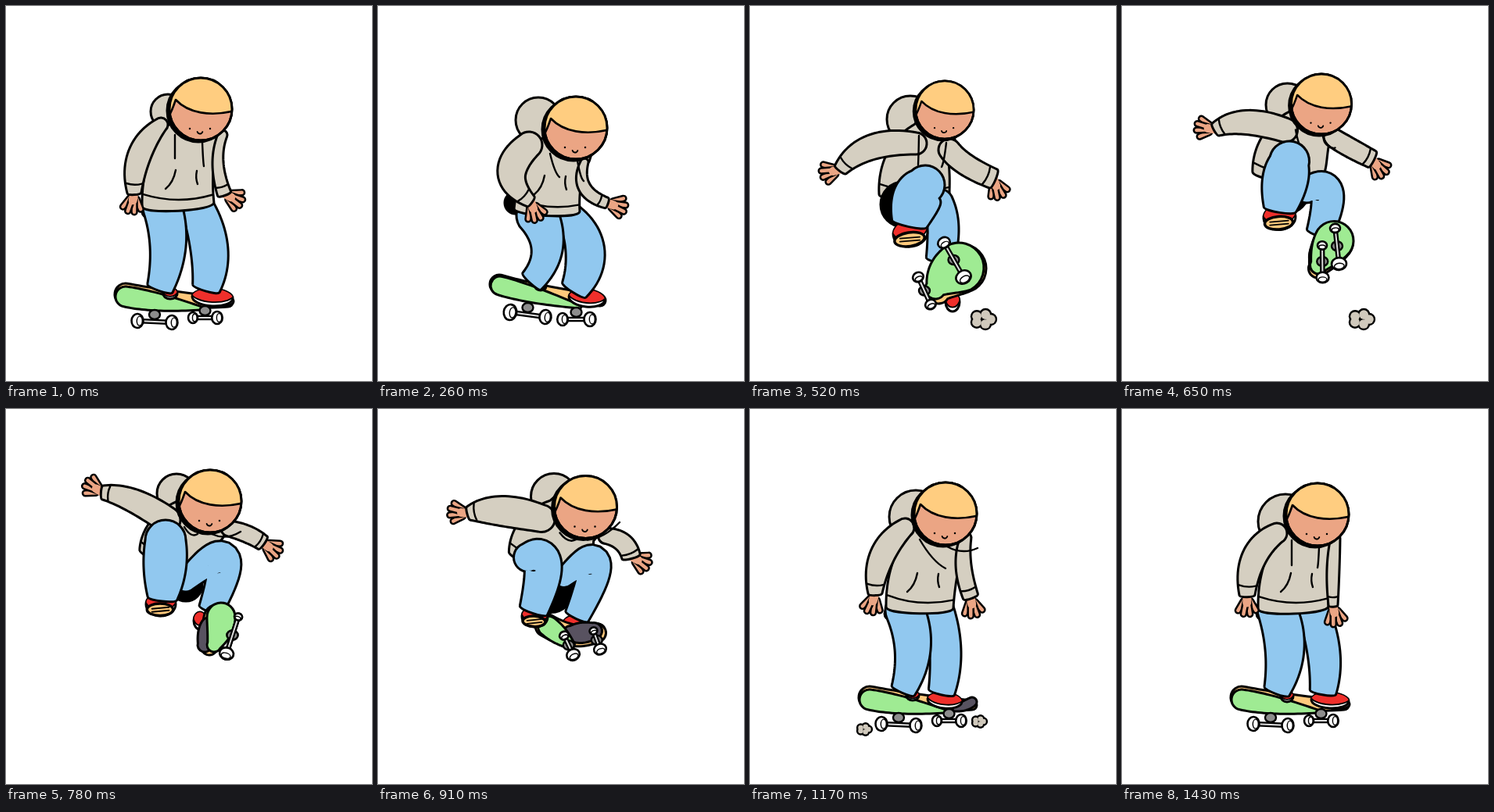
Write an HTML page with a canvas that moves like this. It is 468 px wide and 480 px high and loops after 1560 ms.

```html
<!DOCTYPE html>
<html lang="en">
<head>
<meta charset="utf-8">
<title>Skater</title>
<style>
html, body { margin: 0; width: 100%; height: 100%; overflow: hidden; background: #fff; }
canvas { display: block; }
</style>
</head>
<body>
<canvas id="stage" width="468" height="480"></canvas>
<script>
const ctx = document.getElementById('stage').getContext('2d');
const STEP = 130, COUNT = 12, LINE = 3;
const INK = '#000', CLOTH = '#d5cfc1', SKIN = '#eba584', HAIR = '#ffcd80', DENIM = '#91c8ef';
const RED = '#ef2f2b', GREEN = '#9feb93', WOOD = '#ffc97c', GRIP = '#585260';

// Limbs, torso and deck are three joints [x, y, half width]; hands are the way they point.
const rolling = {
  air: 0, flip: 0,
  rim: [[153, 369, 14], [215, 376, 11], [284, 379, 6]],
  face: [[153, 372, 13], [195, 379, 11], [250, 387, 2]],
  grip: [[270, 382, 2], [280, 381, 3], [287, 378, 4]],
  trucks: [[168, 403, 10, 212, 405, 10], [239, 399, 8, 270, 399, 9]]
};

const stand = {
  ...rolling,
  head: [249, 132, 41], hood: [207, 135, 22], shade: [182, 263, 8],
  body: [[242, 165, 34], [224, 205, 42], [220, 254, 46]],
  armL: [[198, 152, 9], [171, 190, 15], [164, 239, 9]], handL: 1.75,
  armR: [[277, 165, 6], [271, 200, 7], [279, 240, 9]], handR: .5,
  legL: [[200, 258, 25], [207, 308, 23], [197, 361, 17]],
  legR: [[245, 258, 21], [260, 312, 24], [256, 361, 18]],
  shoeL: [210, 368, 9, 7, 0, 0], shoeR: [264, 373, 26, 11, .05, 0],
  tips: [216, 195, 253, 205]
};

const crouch = {
  air: 0, flip: 0,
  rim: [[155, 356, 12], [214, 367, 9], [284, 377, 7]],
  face: [[156, 358, 12], [200, 370, 10], [258, 385, 2]],
  grip: [[275, 381, 2], [281, 380, 3], [286, 378, 4]],
  trucks: [[169, 392, 11, 214, 398, 10], [236, 401, 9, 271, 401, 10]],
  head: [253, 156, 41], hood: [205, 146, 29], shade: [176, 252, 14],
  body: [[240, 185, 33], [223, 220, 38], [216, 261, 42]],
  armL: [[193, 178, 17], [171, 215, 18], [195, 250, 8]], handL: 1.2,
  armR: [[264, 200, 5], [264, 232, 8], [292, 252, 7]], handR: .3,
  legL: [[204, 268, 27], [216, 312, 20], [197, 352, 16]],
  legR: [[245, 268, 17], [265, 315, 25], [251, 363, 18]],
  shoeL: [208, 359, 7, 5, 0, 0], shoeR: [267, 374, 23, 11, .1, 0],
  tips: [232, 219, 263, 224]
};

const pop = {
  air: 1, flip: 1,
  rim: [[271, 336, 31], [254, 350, 26], [241, 367, 14]],
  face: [[267, 335, 32], [250, 347, 26], [237, 362, 13]],
  grip: [[262, 340, 20], [250, 350, 18], [242, 360, 8]],
  trucks: [[215, 347, 8, 231, 382, 8], [248, 303, 9, 273, 347, 11]],
  head: [249, 133, 38], hood: [205, 145, 30], shade: [196, 254, 29],
  body: [[232, 172, 30], [215, 202, 42], [210, 240, 45]],
  armL: [[212, 176, 14], [155, 181, 16], [116, 209, 9]], handL: 2.9,
  armR: [[255, 184, 14], [276, 203, 14], [311, 221, 13]], handR: 1.2,
  legL: [[224, 229, 25], [213, 247, 31], [204, 278, 23]],
  legR: [[242, 252, 18], [247, 285, 20], [243, 325, 18]],
  shoeL: [205, 291, 22, 17, -.15, 1], shoeR: [259, 379, 9, 12, 0, 0],
  tips: [215, 203, 245, 206]
};

const apex = {
  air: 1, flip: 1,
  rim: [[271, 268, 18], [266, 287, 16], [260, 305, 10]],
  face: [[275, 266, 18], [273, 283, 16], [266, 302, 9]],
  grip: [[262, 280, 14], [258, 290, 13], [254, 302, 9]],
  trucks: [[297, 266, 6, 282, 313, 10], [297, 266, 6, 282, 313, 10]],
  head: [261, 118, 41], hood: [218, 108, 25], shade: [230, 225, 21],
  body: [[245, 145, 38], [225, 170, 48], [212, 195, 44]],
  armL: [[206, 142, 17], [162, 117, 15], [124, 107, 9]], handL: 3.66,
  armR: [[285, 153, 10], [308, 160, 11], [328, 171, 10]], handR: .6,
  legL: [[204, 168, 26], [203, 205, 27], [200, 242, 19]],
  legR: [[230, 220, 14], [277, 192, 22], [262, 257, 16]],
  shoeL: [198, 250, 19, 15, 0, 1], shoeR: [248, 271, 8, 11, 0, 0],
  tips: [245, 160, 300, 157]
};

const land = {
  air: 1, flip: 0,
  rim: [[160, 286, 11], [231, 292, 12], [299, 268, 14]],
  face: [[160, 290, 8], [190, 296, 7], [226, 301, 2]],
  grip: [[230, 294, 5], [262, 283, 13], [298, 266, 12]],
  trucks: [[179, 314, 8, 217, 316, 9], [254, 302, 6, 286, 302, 8]],
  head: [270, 133, 41], hood: [232, 116, 34], shade: [212, 238, 37],
  body: [[250, 142, 38], [229, 170, 57], [216, 200, 54]],
  armL: [[212, 138, 18], [152, 144, 23], [109, 160, 9]], handL: 2.8,
  armR: [[298, 172, 10], [317, 181, 13], [319, 206, 14]], handR: .4,
  legL: [[180, 212, 11], [219, 194, 21], [198, 273, 18]],
  legR: [[246, 212, 11], [276, 202, 20], [247, 273, 16]],
  shoeL: [203, 282, 14, 11, .1, 0], shoeR: [248, 284, 16, 13, .1, 0],
  tips: [262, 174, 318, 133]
};

const roll = {
  ...rolling,
  grip: [[262, 384, 3], [274, 380, 6], [284, 375, 6]],
  head: [250, 134, 41], hood: [212, 138, 34], shade: [180, 262, 8],
  body: [[243, 165, 35], [224, 205, 42], [217, 254, 43]],
  armL: [[198, 152, 12], [169, 188, 16], [160, 236, 9]], handL: 1.85,
  armR: [[276, 165, 7], [273, 200, 10], [282, 240, 10]], handR: 1.4,
  legL: [[198, 258, 25], [208, 308, 23], [196, 360, 16]],
  legR: [[243, 258, 18], [250, 312, 20], [245, 362, 17]],
  shoeL: [208, 367, 8, 6, 0, 0], shoeR: [249, 373, 22, 10, .1, 0],
  tips: [250, 204, 291, 178]
};

const glide = {
  ...rolling,
  head: [250, 135, 41], hood: [209, 144, 35], shade: [180, 262, 8],
  body: [[243, 165, 35], [224, 205, 42], [219, 254, 45]],
  armL: [[198, 159, 13], [169, 190, 16], [160, 238, 10]], handL: 1.6,
  armR: [[273, 165, 6], [270, 205, 8], [270, 251, 6]], handR: 1.4,
  legL: [[198, 257, 25], [208, 308, 25], [198, 361, 17]],
  legR: [[244, 257, 20], [258, 312, 21], [257, 362, 17]],
  shoeL: [211, 368, 8, 7, 0, 0], shoeR: [266, 373, 24, 10, .05, 0],
  tips: [217, 200, 250, 203]
};

const keys = [[0, stand], [2, crouch], [4, pop], [6, apex], [8, land], [9, roll], [11, glide]];

function mix(a, b, t) {
  if (typeof a === 'number') return a + (b - a) * t;
  if (Array.isArray(a)) return a.map((v, i) => mix(v, b[i], t));
  return Object.fromEntries(Object.keys(a).map(k => [k, mix(a[k], b[k], t)]));
}

function poseAt(step) {
  const i = keys.findLastIndex(k => k[0] <= step);
  const [from, a] = keys[i], [to, b] = keys[i + 1] || [COUNT, a];
  return mix(a, b, (step - from) / (to - from));
}

function paint(fill, width = LINE) {
  ctx.lineWidth = width;
  if (fill) { ctx.fillStyle = fill; ctx.fill(); }
  ctx.stroke();
}

function oval(x, y, rx, ry, fill, width, turn = 0) {
  ctx.beginPath();
  ctx.ellipse(x, y, rx, ry, turn, 0, 7);
  paint(fill, width);
}

function line(points, color = INK, width = 2.4) {
  ctx.beginPath();
  points.forEach(p => ctx.lineTo(...p));
  ctx.strokeStyle = color;
  paint(null, width);
  ctx.strokeStyle = INK;
}

function bow(a, control, b) {
  ctx.beginPath();
  ctx.moveTo(...a);
  ctx.quadraticCurveTo(...control, ...b);
  paint(null, 2.4);
}

// Place, half width and heading on the parabola through three joints.
function along([a, b, c], t) {
  const [x, y, r] = a.map((v, i) => v * (1 - t) * (1 - 2 * t) + b[i] * 4 * t * (1 - t) + c[i] * t * (2 * t - 1));
  const slope = i => a[i] * (4 * t - 3) + b[i] * (4 - 8 * t) + c[i] * (4 * t - 1);
  return { x, y, r: Math.max(r - LINE / 2, .5), turn: Math.atan2(slope(1), slope(0)) };
}

function edge(joints, t, side) {
  const { x, y, r, turn } = along(joints, t);
  return [x - side * r * Math.sin(turn), y + side * r * Math.cos(turn)];
}

// Round at the first joint; the bulge sets how round the last one is.
function tube(joints, fill, bulge = .15) {
  const a = along(joints, 0), b = along(joints, 1), q = Math.PI / 2;
  ctx.beginPath();
  ctx.arc(a.x, a.y, a.r, a.turn + q, a.turn + 3 * q);
  for (let t = 0; t < 1; t += 1 / 24) ctx.lineTo(...edge(joints, t, -1));
  ctx.ellipse(b.x, b.y, b.r * bulge, b.r, b.turn, -q, q);
  for (let t = 1; t > 0; t -= 1 / 24) ctx.lineTo(...edge(joints, t, 1));
  ctx.closePath();
  ctx.lineWidth = LINE * 2;
  ctx.stroke();
  ctx.fillStyle = fill;
  ctx.fill();
}

function rib(joints, t) {
  const { x, y, r, turn } = along(joints, t);
  bow(edge(joints, t, -1), [x + r * .3 * Math.cos(turn), y + r * .3 * Math.sin(turn)], edge(joints, t, 1));
}

function arm(joints, aim) {
  const [x, y] = joints[2];
  const reach = (d, a) => [x + d * Math.cos(a), y + d * Math.sin(a)];
  const fingers = [-.55, .5, -.18, .16].map(a => [reach(9, aim + a), reach(25 - 8 * a * a, aim + a)]);
  for (const finger of fingers) {
    line(finger, INK, 9.5);
    line(finger, SKIN, 4.5);
  }
  line([[x, y], reach(10, aim)], SKIN, 11);
  tube(joints, CLOTH);
  rib(joints, .89);
}

function shoe([x, y, rx, ry, turn, tread]) {
  ctx.save();
  ctx.translate(x, y);
  ctx.rotate(turn);
  oval(0, 0, rx, ry, '#fff');
  ctx.clip();
  oval(0, -ry * .45, rx * 1.05, ry, RED, 1.8);
  ctx.restore();
  if (tread < .5) return;
  const cy = y + ry * .45;
  oval(x - 1, cy, rx * .88, ry * .52, WOOD, 3.5, turn);
  for (const d of [-2, 2]) line([[x - rx * .6, cy + d + 1], [x + rx * .55, cy + d - 1]], INK, 1.8);
}

function truck([ax, ay, ar, bx, by, br], flip) {
  const turn = Math.atan2(by - ay, bx - ax);
  oval((ax + bx) / 2, (ay + by) / 2 - (flip ? 0 : 9), 7, 6, '#8d8d8d', 2.4);
  line([[ax, ay], [bx, by]], INK, 6.5);
  line([[ax, ay], [bx, by]], '#ddd', 2);
  for (const [x, y, r] of [[ax, ay, ar], [bx, by, br]]) {
    const shift = r * .28;
    oval(x, y, r * .75, r - 1, '#fff', 2.6, turn);
    oval(x + shift * Math.cos(turn), y + shift * Math.sin(turn), r * .35, r * .6, '#fff', 1.4, turn);
  }
}

function skateboard(p) {
  tube(p.rim, WOOD, 1);
  tube(p.grip, GRIP, 1);
  tube(p.face, GREEN, 1);
  p.trucks.forEach(t => truck(t, p.flip >= .5));
}

function stance(p) {
  const [x, y, r] = p.shade;
  const right = () => { shoe(p.shoeR); tube(p.legR, DENIM); };
  oval(x, y, r, r, INK);
  if (p.flip >= .5) right();
  skateboard(p);
  shoe(p.shoeL);
  if (p.flip < .5) right();
  tube(p.legL, DENIM);
}

function head([x, y, r]) {
  ctx.save();
  ctx.translate(x, y);
  ctx.scale(r / 41, r / 41);
  oval(-3, 2, 40, 40, INK);
  oval(0, 0, 40, 40, SKIN);
  ctx.save();
  ctx.clip();
  ctx.beginPath();
  ctx.moveTo(-44, 14);
  ctx.quadraticCurveTo(-38, 6, -32, -12);
  ctx.bezierCurveTo(-16, 5, 12, 10, 44, 2);
  ctx.lineTo(44, -46);
  ctx.lineTo(-46, -46);
  paint(HAIR, 2.6);
  ctx.restore();
  oval(0, 0, 40, 40);
  for (const eye of [-14, 12]) oval(eye, 25, .6, .6, INK, 1.3);
  ctx.beginPath();
  ctx.arc(-1, 28, 3.5, .3, 2.85);
  paint(null, 1.9);
  ctx.restore();
}

function clothes(p) {
  const [hx, hy] = p.head, [x, y] = p.body[2], [ax, ay, bx, by] = p.tips;
  oval(...p.hood, p.hood[2], CLOTH);
  tube(p.body, CLOTH);
  rib(p.body, .88);
  if (p.air < .5) {
    bow([x - 3, y - 44], [x - 6, y - 28], [x - 16, y - 20]);
    bow([x + 24, y - 43], [x + 22, y - 34], [x + 25, y - 26]);
  }
  arm(p.armR, p.handR);
  arm(p.armL, p.handL);
  for (const [sx, sy, tx, ty] of [[hx - 33, hy + 33, ax, ay], [hx + 2, hy + 42, bx, by]])
    bow([sx, sy], [(sx + tx) / 2, (sy + ty) / 2 + 10], [tx, ty]);
}

// A cloud that lasts two steps and drifts.
function puff(age, x, y, size, drift) {
  if (age !== 0 && age !== 1) return;
  for (const [fill, grow] of [[INK, 2.4], ['#d0c9bc', 0]])
    for (let i = 0; i < 5; i++) {
      const r = 6.5 * size + grow;
      ctx.beginPath();
      ctx.arc(x + age * drift + 11 * size * Math.cos(i * 1.26), y + 7 * size * Math.sin(i * 1.26), r, 0, 7);
      ctx.fillStyle = fill;
      ctx.fill();
    }
}

function draw(step) {
  const p = poseAt(step);
  ctx.fillStyle = '#fff';
  ctx.fillRect(0, 0, 468, 480);
  ctx.strokeStyle = INK;
  ctx.lineJoin = ctx.lineCap = 'round';
  puff(step - 4, 298, 401, .9, 8);
  puff(step - 9, 146, 410, .5, -20);
  puff(step - 9, 293, 400, .5, 14);
  if (p.air < .5) stance(p);
  clothes(p);
  if (p.air >= .5) stance(p);
  head(p.head);
}

const start = performance.now();
function tick() {
  draw(Math.floor((performance.now() - start) / STEP) % COUNT);
  requestAnimationFrame(tick);
}
tick();
</script>
</body>
</html>
```
